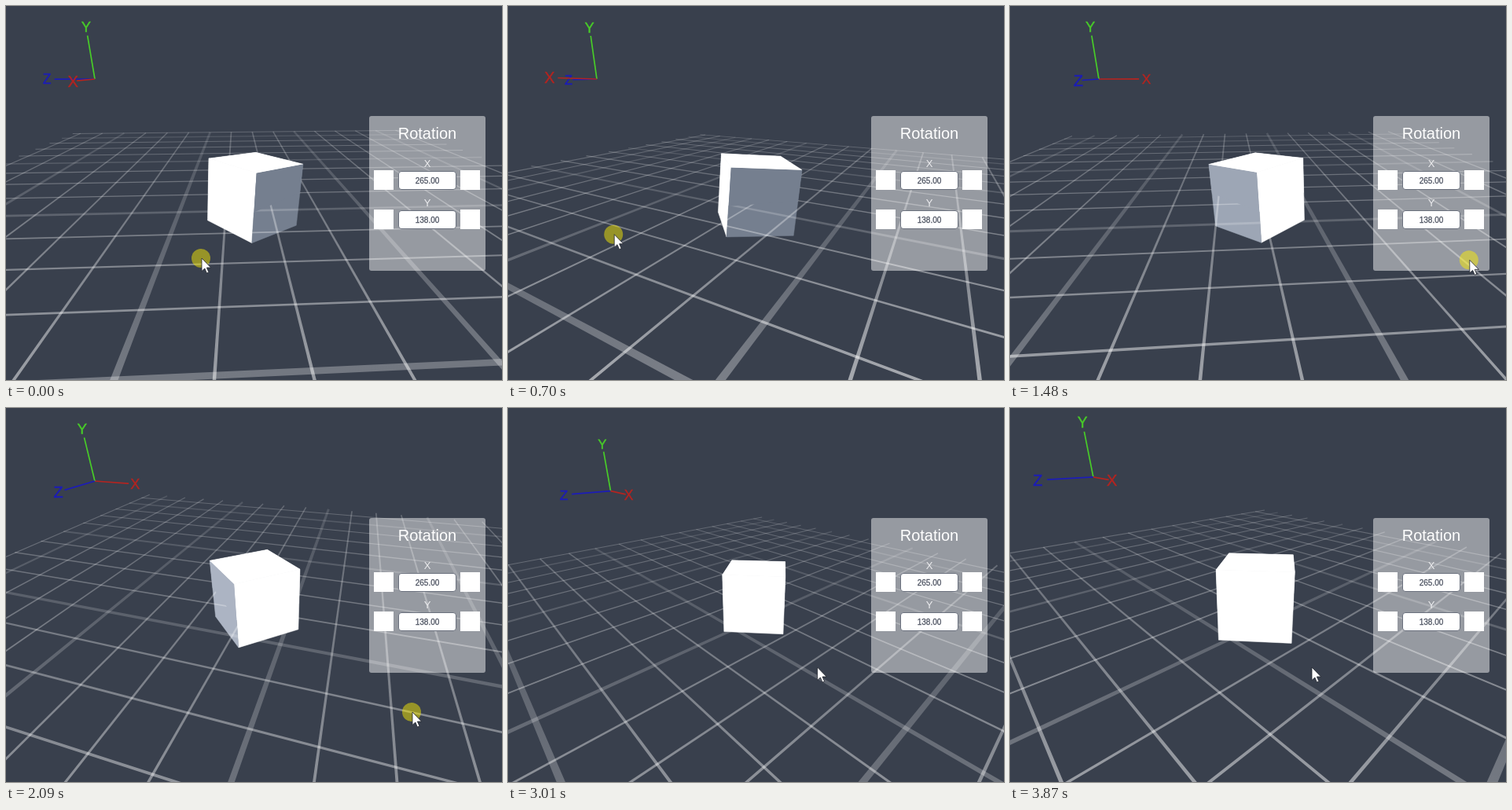
Recreate the animation shown at these times as an HTML page with a canvas. Size 631x476 px, loop 3.95 s.

```html
<!DOCTYPE html>
<html lang="en">
<head>
<meta charset="utf-8">
<title>Rotation</title>
<style>
html, body { margin: 0; width: 100%; height: 100%; overflow: hidden; background: #39404d; }
body { position: relative; font-family: "Liberation Sans", Arial, sans-serif; }
canvas { position: absolute; left: 0; top: 0; display: block; }
.panel {
  position: absolute; left: 462px; top: 140px; width: 148px; height: 197px;
  border-radius: 3px; background: rgba(255,255,255,.47); color: #fff; text-align: center;
}
.panel div { position: absolute; box-sizing: border-box; }
.title { left: 0; width: 148px; top: 10px; font-size: 20px; line-height: 24px; }
.row { left: 0; width: 148px; height: 50px; }
.name { left: 0; width: 148px; top: 0; font-size: 13px; line-height: 16px; color: #ececee; }
.btn { top: 16px; width: 25px; height: 25px; background: #fff; }
.field {
  left: 37px; top: 17px; width: 74px; height: 24px; border: 1px solid #6a707d; border-radius: 4px;
  background: #fff; color: #505664; font-size: 10px; line-height: 23px; -webkit-text-stroke: .3px #505664;
}
#pointer { position: absolute; left: 0; top: 0; overflow: visible; }
</style>
</head>
<body>
<canvas id="view" width="631" height="476"></canvas>
<div class="panel">
  <div class="title">Rotation</div>
  <div class="row" style="top:53px">
    <div class="name">X</div>
    <div class="btn" style="left:6px"></div><div class="field">265.00</div><div class="btn" style="left:116px"></div>
  </div>
  <div class="row" style="top:103px">
    <div class="name">Y</div>
    <div class="btn" style="left:6px"></div><div class="field">138.00</div><div class="btn" style="left:116px"></div>
  </div>
</div>
<svg id="pointer" width="1" height="1">
  <circle id="press" cx="-1" cy="0" r="12" fill="rgba(255,240,0,.48)"/>
  <path d="M0 0V16.5L3.8 13L6.4 19L9 17.9L6.4 12H11.6Z" fill="#fff" stroke="#20242c" stroke-width=".8"/>
</svg>
<script>
const LOOP = 3950, STEP = LOOP / 51, RELEASE = 33;
const W = 631, H = 476, CX = 315.5, CY = 238, FOCAL = 412, NEAR = 1.4;
const RAD = Math.PI / 180;
const ctx = document.getElementById('view').getContext('2d');
const pointer = document.getElementById('pointer');
const press = document.getElementById('press');

// step, yaw, pitch, distance, pointer x, pointer y
const KEYS = [
  [0, 93, 21.4, 5, 249, 321],
  [5, 58.6, 17.7, 5, 126, 290],
  [8, 58.6, 17.7, 5, 126, 290],
  [20, 186.9, 20.9, 5, 594, 324],
  [22, 186.9, 20.9, 5, 594, 324],
  [27, 163.3, 31, 5, 517, 387],
  [28, 163.3, 31, 5, 517, 387],
  [33, 133.3, 24.5, 5, 421, 345],
  [36, 133.3, 24.5, 5, 394, 330],
  [43, 133.3, 24.5, 6.93, 393, 330],
  [45, 133.3, 24.5, 6.93, 393, 330],
  [47, 133.3, 24.5, 5.83, 388, 330],
  [48, 133.3, 24.5, 5.83, 388, 330],
  [50, 133.3, 24.5, 4.73, 384, 330]
];

const dot = (a, b) => a[0] * b[0] + a[1] * b[1] + a[2] * b[2];
const mul = (a, k) => a.map(v => v * k);
const add = (a, b) => a.map((v, i) => v + b[i]);
const mix = (a, b, k) => a.map((v, i) => v + (b[i] - v) * k);
const heading = deg => [Math.sin(deg * RAD), 0, Math.cos(deg * RAD)];

function poseAt(n) {
  let i = 0;
  while (i < KEYS.length - 2 && KEYS[i + 1][0] <= n) i++;
  const a = KEYS[i], b = KEYS[i + 1];
  const u = Math.min(1, (n - a[0]) / (b[0] - a[0]));
  return mix(a, b, u * u * (3 - 2 * u));
}

function makeCamera(yaw, pitch, dist) {
  const c = Math.cos(pitch * RAD), s = Math.sin(pitch * RAD), h = heading(yaw);
  const right = heading(yaw + 90);
  const up = [h[0] * s, c, h[2] * s];
  const fwd = [h[0] * c, -s, h[2] * c];
  const turn = p => [dot(p, right), dot(p, up), dot(p, fwd)];
  return { yaw, dist, turn, eye: mul(fwd, -dist), place: p => add(turn(p), [0, 0, dist]) };
}

const project = p => [CX + FOCAL * p[0] / p[2], CY - FOCAL * p[1] / p[2]];

function fillPoly(points, style) {
  ctx.beginPath();
  points.forEach(p => ctx.lineTo(p[0], p[1]));
  ctx.closePath();
  ctx.fillStyle = style;
  ctx.fill();
}

// Floor lines: width and 1/depth are linear on screen, so one quad with one gradient is enough.
function floorLine(cam, from, to, side, bold) {
  let a = cam.place(from), b = cam.place(to);
  if (a[2] < NEAR && b[2] < NEAR) return;
  const k = (NEAR - a[2]) / (b[2] - a[2]);
  if (a[2] < NEAR) a = mix(a, b, k);
  else if (b[2] < NEAR) b = mix(a, b, k);
  const off = mul(cam.turn(side), bold ? .023 : .009);
  const p = project(a), q = project(b);
  const len = Math.hypot(q[0] - p[0], q[1] - p[1]) || 1;
  const nx = -(q[1] - p[1]) / len, ny = (q[0] - p[0]) / len;
  const half = (pt, scr) => {
    const e = project(add(pt, off));
    return Math.abs((e[0] - scr[0]) * nx + (e[1] - scr[1]) * ny) + .4;
  };
  const wa = half(a, p), wb = half(b, q);
  const tone = z => `rgba(255,255,255,${(.13 + .75 / z) * (bold ? .6 : 1)})`;
  const grad = ctx.createLinearGradient(p[0], p[1], q[0], q[1]);
  grad.addColorStop(0, tone(a[2]));
  grad.addColorStop(1, tone(b[2]));
  fillPoly([
    [p[0] + nx * wa, p[1] + ny * wa], [q[0] + nx * wb, q[1] + ny * wb],
    [q[0] - nx * wb, q[1] - ny * wb], [p[0] - nx * wa, p[1] - ny * wa]
  ], grad);
}

function drawFloor(cam) {
  for (let i = 0; i < 16; i++) {
    const x = -4.4 + i * .625, z = -4.585 + i * .625;
    floorLine(cam, [x, 0, -5], [x, 0, 5], [1, 0, 0], i % 4 === 2);
    floorLine(cam, [-5, 0, z], [5, 0, z], [0, 0, 1], i % 4 === 1);
  }
}

const TILT = 5 * RAD, AHEAD = heading(138), UP = [0, 1, 0];
const AXES = [
  add(mul(AHEAD, Math.cos(TILT)), mul(UP, -Math.sin(TILT))),
  heading(228),
  add(mul(UP, Math.cos(TILT)), mul(AHEAD, Math.sin(TILT)))
];

function aboveFloor(poly) {
  const out = [];
  poly.forEach((p, i) => {
    const q = poly[(i + 1) % poly.length];
    if (p[1] >= 0) out.push(p);
    if (p[1] >= 0 !== q[1] >= 0) out.push(mix(p, q, p[1] / (p[1] - q[1])));
  });
  return out;
}

function drawCube(cam, upperOnly) {
  const lit = Math.max(0, Math.min(1, (187 - cam.yaw) / 21));
  const pale = `rgb(${mix([155, 164, 179], [172, 180, 195], lit).map(Math.round)})`;
  AXES.forEach((axis, i) => [-1, 1].forEach(sign => {
    const mid = mul(axis, sign / 2);
    if (dot(axis, add(cam.eye, mul(mid, -1))) * sign <= 0) return;
    const u = mul(AXES[(i + 1) % 3], .5), v = mul(AXES[(i + 2) % 3], .5);
    let poly = [[1, 1], [1, -1], [-1, -1], [-1, 1]]
      .map(([s, t]) => add(mid, add(mul(u, s), mul(v, t))));
    if (upperOnly) poly = aboveFloor(poly);
    if (poly.length < 3) return;
    const color = i !== 1 ? '#fff' : sign > 0 ? '#757f8f' : pale;
    fillPoly(poly.map(p => project(cam.place(p))), color);
    if (!upperOnly) {
      ctx.strokeStyle = color;
      ctx.lineWidth = .5;
      ctx.stroke();
    }
  }));
}

const GIZMO = [
  ['Z', [0, 0, 1], '#1c1cb8'],
  ['X', [-1, 0, 0], '#b42420'],
  ['Y', [0, 1, 0], '#48cc28']
];

function drawGizmo(cam) {
  const base = [-3.932, 2.816, 3 + cam.dist];
  const start = project(base);
  ctx.textAlign = 'center';
  ctx.textBaseline = 'alphabetic';
  GIZMO.map(g => ({ name: g[0], dir: cam.turn(g[1]), color: g[2] }))
    .sort((a, b) => b.dir[2] - a.dir[2])
    .forEach(({ name, dir, color }) => {
      const end = project(add(base, mul(dir, .97)));
      const tip = add(base, mul(dir, 1.15)), at = project(tip);
      const size = 17.5 * 8 / tip[2];
      ctx.strokeStyle = ctx.fillStyle = color;
      ctx.lineWidth = 1.7;
      ctx.beginPath();
      ctx.moveTo(start[0], start[1]);
      ctx.lineTo(end[0], end[1]);
      ctx.stroke();
      ctx.font = `${size}px "Liberation Sans", Arial, sans-serif`;
      ctx.lineWidth = .4;
      ctx.fillText(name, at[0], at[1] + size * .35);
      ctx.strokeText(name, at[0], at[1] + size * .35);
    });
}

function draw(time) {
  const n = Math.floor(((time % LOOP) + 10) / STEP) % 51;
  const [, yaw, pitch, dist, x, y] = poseAt(n);
  const cam = makeCamera(yaw, pitch, dist);
  ctx.fillStyle = '#39404d';
  ctx.fillRect(0, 0, W, H);
  drawCube(cam, false);
  drawFloor(cam);
  drawCube(cam, true);
  drawGizmo(cam);
  pointer.style.transform = `translate(${x}px,${y}px)`;
  press.style.display = n < RELEASE ? '' : 'none';
}

const begin = performance.now();
function tick() {
  draw(performance.now() - begin);
  requestAnimationFrame(tick);
}
tick();
</script>
</body>
</html>
```
